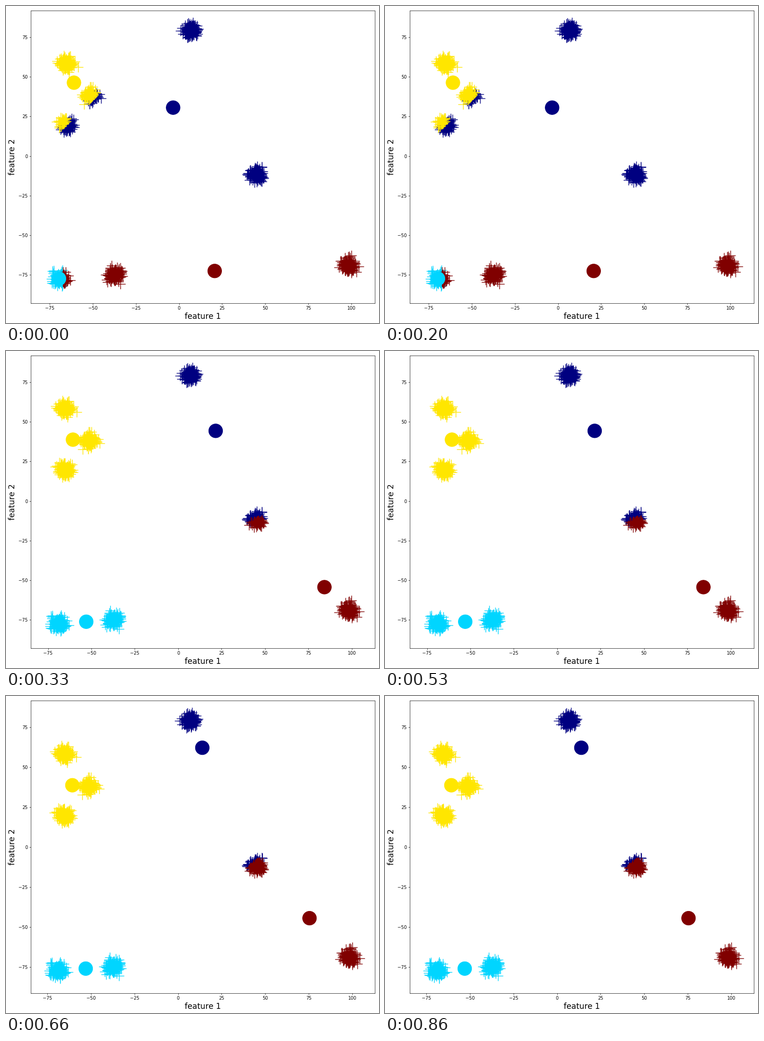
Write a matplotlib script that moves like this. It is 812 by 690 pixels and loops after 990 ms.

```python
import numpy as np
import matplotlib.pyplot as plt
from matplotlib.animation import FuncAnimation
from matplotlib.ticker import MultipleLocator

W, H, DPI = 812, 690, 69
STEPS = 3
BLOB_SIZE, SIGMA = 160, 2.0

BLOBS = [(6.8, 79.3), (-65.2, 58.4), (-51.3, 38.1), (-65.5, 19.8),
         (45.1, -11.7), (-68.8, -77.3), (-37.2, -74.9), (98.2, -69)]
SEEDS = np.array([(-49.1, 34.4), (-69.8, -77), (-53.5, 38.6), (-64.8, -77)])
COLORS = plt.cm.jet(np.linspace(0, 1, len(SEEDS)))

# View edges at each step: left, right, bottom
VIEWS = [(-85.9, 113.6, -92.7), (-84.95, 113.3, -92.7), (-84.5, 112.9, -91.4)]
TOP = 91.8


def make_blob(rng, centre):
    cloud = rng.normal(size=(BLOB_SIZE, 2))
    cloud = (cloud - cloud.mean(axis=0)) / cloud.std(axis=0)
    return centre + SIGMA * cloud


def nearest(pts, centroids):
    gaps = pts[:, None] - centroids[None]
    return (gaps ** 2).sum(axis=2).argmin(axis=1)


def k_means(pts, centroids, steps):
    history = []
    for _ in range(steps):
        labels = nearest(pts, centroids)
        centroids = np.array([pts[labels == k].mean(axis=0)
                              for k in range(len(centroids))])
        history.append((labels, centroids))
    return history


rng = np.random.default_rng(8)
points = np.vstack([make_blob(rng, centre) for centre in BLOBS])
history = k_means(points, SEEDS, STEPS)

# The hair of extra width keeps the pixel count from rounding down
fig = plt.figure(figsize=((W + 0.01) / DPI, H / DPI), dpi=DPI, facecolor="white")
ax = fig.add_axes([54 / W, 43.5 / H, 749 / W, 636.5 / H])


def draw(step):
    labels, centroids = history[step]
    left, right, bottom = VIEWS[step]
    ax.clear()
    for k, color in enumerate(COLORS):
        ax.scatter(*points[labels == k].T, s=500, marker="+",
                   color=color, linewidths=1.5)
    ax.scatter(*centroids.T, s=1000, c=COLORS, zorder=3)
    ax.set(xlim=(left, right), ylim=(bottom, TOP))
    for axis in (ax.xaxis, ax.yaxis):
        axis.set_major_locator(MultipleLocator(25))
    ax.set_xlabel("feature 1", fontsize=18)
    ax.set_ylabel("feature 2", fontsize=18)
    return ax.collections


anim = FuncAnimation(fig, draw, frames=STEPS, interval=330,
                     repeat=True, repeat_delay=0, init_func=lambda: draw(0))
plt.show()
```
